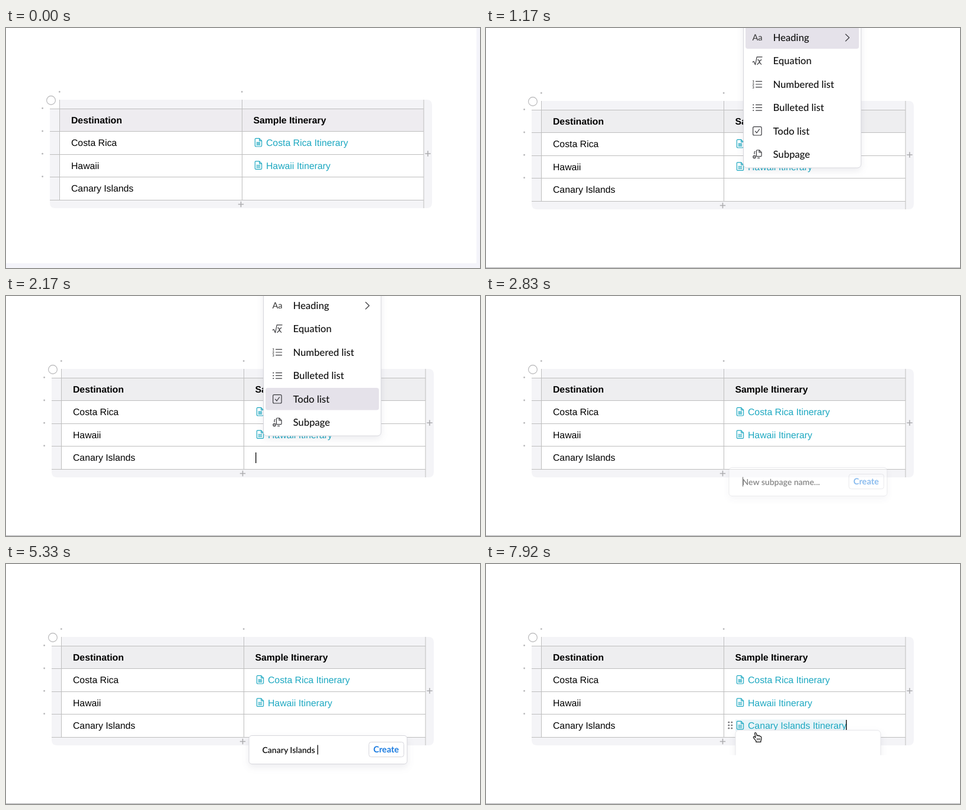
Recreate the animation shown at these times as an HTML page. Size 800 by 405 pixels, loop 8000 ms.

```html
<!DOCTYPE html>
<html lang="en">
<head>
<meta charset="utf-8">
<title>Table subpages</title>
<style>
  html, body { margin: 0; width: 100%; height: 100%; overflow: hidden; background: #fff; }
  svg { display: block; width: 800px; height: 405px; }
  text { white-space: pre; text-rendering: geometricPrecision; }
  .cell { font: 15.75px "Liberation Sans", Arial, sans-serif; }
  .head { font-weight: 700; }
  .link { fill: #1ca8c1; }
  .item { font: 500 16.6px Lato, sans-serif; fill: #111; }
  .field { font: 600 14px Lato, sans-serif; fill: #111; }
  .button { font: 700 14.6px Lato, sans-serif; fill: #1a7be0; }
  .grid { stroke: #bebebe; fill: none; }
  .strip { fill: #f4f4f7; }
  .header { fill: var(--header, #eeeef0); }
  .dots { fill: #b6b6b8; }
  .plus { stroke: #adadb0; stroke-width: 1.6; }
  .doc { fill: none; stroke: #1ca8c1; stroke-width: 1.15; stroke-linejoin: round; stroke-linecap: round; }
  .icon { fill: none; stroke: #3a3a3e; stroke-width: 1.2; stroke-linejoin: round; stroke-linecap: round; }
  .tiny { font: 700 5.5px Lato, sans-serif; fill: #333; }
  .card { fill: #fff; stroke: #d6d6dc; }
  .floating { filter: drop-shadow(0 5px 6px rgba(50, 50, 90, .09)); }
  .caret { fill: #111; }
  #before { --header: #eeecf0; }
</style>
</head>
<body>
<svg viewBox="0 0 800 405">
  <defs>
    <path id="doc" class="doc" d="M2 .7H8L12 4.7V12.6Q12 14.3 10.3 14.3H2.2Q.7 14.3.7 12.6V2.2Q.7.7 2 .7ZM8 .9V4.7H11.8M3.4 7.4H9.2M3.4 9.4H9.2M3.4 11.4H9.2"/>
    <clipPath id="cut"><rect x="400" y="260" width="300" height="62.5"/></clipPath>
    <g id="table">
      <path class="strip" d="M93 123H713Q722 123 722 132V297Q722 306 713 306H86Q77 306 77 297V138H93Z"/>
      <rect x="93" y="138" width="615" height="154" fill="#fff"/>
      <rect class="header" x="93" y="138" width="615" height="39"/>
      <path class="grid" d="M77 138.5H708M77 176.5H708M77 215.5H708M77 253.5H708M77 292.5H708M93.5 123V292M401.5 123V292M708 123V306"/>
      <circle cx="79" cy="124" r="7.4" fill="#fff" stroke="#b4b4b6" stroke-width="1.1"/>
      <g class="dots">
        <circle cx="93.3" cy="109.7" r="1.4"/><circle cx="401.2" cy="109.7" r="1.4"/>
        <circle cx="64.6" cy="137.4" r="1.4"/><circle cx="64.6" cy="176" r="1.4"/>
        <circle cx="64.6" cy="214.2" r="1.4"/><circle cx="64.6" cy="252.7" r="1.4"/>
      </g>
      <path class="plus" d="M394.8 299.5H404.2M399.5 294.8V304.2M710.3 214H719.7M715 209.3V218.7"/>
      <g class="cell">
        <text class="head" x="113" y="162.8">Destination</text>
        <text class="head" x="420.6" y="162.8">Sample Itinerary</text>
        <text x="113" y="201.3">Costa Rica</text>
        <text x="113" y="239.7">Hawaii</text>
        <text x="113" y="278.2">Canary Islands</text>
        <text class="link" x="442" y="201.3">Costa Rica Itinerary</text>
        <text class="link" x="442" y="239.7">Hawaii Itinerary</text>
      </g>
      <use href="#doc" x="422.6" y="187.7"/>
      <use href="#doc" x="422.6" y="226.1"/>
    </g>
  </defs>

  <rect width="800" height="405" fill="#fff"/>
  <rect y="404" width="800" height="1" fill="#b0b0b2"/>
  <use href="#table"/>
  <g id="before">
    <rect width="800" height="405" fill="#f4f4fa"/>
    <rect width="794" height="397" fill="#fff"/>
    <use href="#table" x="-3" y="-2"/>
  </g>

  <rect id="cellCaret" class="caret" x="421" y="264" width="1.4" height="18"/>

  <g id="menu">
    <rect class="card floating" x="434.5" y="-20" width="198.5" height="256" rx="6"/>
    <rect id="bar" x="438" width="191.5" height="37.6" rx="4" fill="#e5e2ea"/>
    <g id="items" class="item"></g>
    <text x="449.5" y="21" font-size="14.5" font-family="Lato, sans-serif" fill="#333">Aa</text>
    <g class="icon">
      <path d="M607 10.5L613 16.2L607 22"/>
      <path d="M450 57.5L452 56.3L454.5 62L457.2 48.8H466M458.6 53.8Q460.4 53.2 461 56T464.6 61.4M464.8 53.6Q462.6 54 461.4 57.2T457.8 61.4"/>
      <path d="M455.5 90.2H465.5M455.5 95H465.5M455.5 99.8H465.5M455.5 129.7H465.5M455.5 134.4H465.5M455.5 139.1H465.5"/>
      <path d="M451 129.7H451.4M451 134.4H451.4M451 139.1H451.4" stroke-width="1.7"/>
      <rect x="450.6" y="166.6" width="14.4" height="14.4" rx="2"/>
      <path d="M454.4 174.2L457 177L461.4 170.8"/>
      <path d="M457.5 206H461.2L465 209.8V215.5Q465 216.6 464 216.6H457.5Q456.4 216.6 456.4 215.5V207.2Q456.4 206 457.5 206ZM461 206.2V210H464.8M454 208.4Q453 208.6 453 209.8V212.6M461.6 219.4H458.6"/>
      <circle cx="453" cy="217.6" r="2.2" fill="#3a3a3e"/>
      <path d="M453 216V219.2M451.4 217.6H454.6" stroke="#fff" stroke-width=".8"/>
    </g>
    <g class="tiny"><text x="449.6" y="92">1</text><text x="449.6" y="96.9">2</text><text x="449.6" y="101.8">3</text></g>
  </g>

  <g id="popup">
    <rect class="card floating" x="410" y="289.5" width="267" height="48" rx="5"/>
    <rect class="card" x="612.5" y="300.5" width="59" height="25" rx="4"/>
    <text class="button" x="620" y="318">Create</text>
    <text id="field" class="field" x="432.5" y="318.5"></text>
    <rect id="fieldCaret" class="caret" y="305.5" width="1.4" height="16"/>
  </g>

  <g id="added">
    <rect id="tint" x="421" y="262.5" width="187" height="19.5" fill="#e8f4f8"/>
    <use href="#doc" x="422.6" y="264.6"/>
    <text class="cell link" x="442" y="278.2">Canary Islands Itinerary</text>
    <rect class="caret" x="607.6" y="263" width="1.4" height="18.5"/>
  </g>
  <g id="panel" clip-path="url(#cut)">
    <rect class="floating" x="421" y="280.5" width="245" height="80" rx="6" fill="#fff" stroke="#e6e6ea"/>
  </g>
  <g id="hover">
    <g fill="#77777a">
      <circle cx="409.8" cy="267.2" r="1.4"/><circle cx="414.8" cy="267.2" r="1.4"/>
      <circle cx="409.8" cy="272.2" r="1.4"/><circle cx="414.8" cy="272.2" r="1.4"/>
      <circle cx="409.8" cy="277.2" r="1.4"/><circle cx="414.8" cy="277.2" r="1.4"/>
    </g>
    <path fill="#fff" stroke="#111" stroke-width="1.2" stroke-linejoin="round"
      d="M455.8 300.4V298.6L452 293.8Q450.6 291.8 452 291.2Q453.2 290.8 455 293L453.6 286.2Q453.4 284.6 454.6 284.5Q455.7 284.4 456.2 286L457.4 290Q457.8 288.8 459 289.1Q460 289.4 460.2 290.3Q461 289.3 462 289.9Q462.8 290.4 462.8 291.2Q464.8 290.6 464.8 293V296Q464.6 297.4 463.8 298.4V300.4Z"/>
    <path stroke="#111" d="M457.8 294V297.4M460 294V297.4M462.2 294V297.4"/>
  </g>
</svg>
<script>
const LOOP = 8000;
const ROWS = ["Heading", "Equation", "Numbered list", "Bulleted list", "Todo list", "Subpage"];
const NAME = "Canary Islands Itinerary";
const KEYS = [3920, 4080, 4170, 4250, 4330, 4420, 4420, 4580, 4750, 4920, 5000, 5170,
  5250, 5330, 5330, 5500, 5670, 5750, 5830, 5920, 6000, 6080, 6170, 6250];
const DOWN = [1500, 2000, 2080, 2170, 2330];
const BLINK = [500, 920, 1250, 1670, 2080, 2420];
const FADE = [80, 160, 250, 330];

const el = id => document.getElementById(id);
const passed = (t, times) => times.filter(k => t >= k).length;
const within = (t, a, b) => t >= a && t < b;
const show = (id, alpha) => {
  el(id).style.display = alpha ? "" : "none";
  el(id).style.opacity = Number(alpha);
};
const rowY = i => 16.2 + i * 39.4;

ROWS.forEach((label, i) => {
  const text = document.createElementNS("http://www.w3.org/2000/svg", "text");
  text.setAttribute("x", 484.5);
  text.setAttribute("y", rowY(i) + 5.8);
  text.textContent = label;
  el("items").append(text);
});

function render(t) {
  show("before", 1 - passed(t, FADE) / FADE.length);
  show("cellCaret", passed(t, BLINK) % 2);

  show("menu", within(t, 1080, 2830) && (t < 1170 ? 0.6 : 1));
  el("bar").setAttribute("y", rowY(passed(t, DOWN)) - 18.8);

  show("popup", within(t, 2830, 6420) && Math.min(1, 0.5 + 0.25 * passed(t, [2920, 3000])));
  const typed = passed(t, KEYS);
  const field = el("field");
  field.textContent = typed ? NAME.slice(0, typed) : "New subpage name...";
  show("fieldCaret", !within(t, 3250, 3670));
  if (within(t, 2830, 6420))
    el("fieldCaret").setAttribute("x", 432.8 + (typed && field.getComputedTextLength()));

  show("added", t >= 7670);
  show("tint", t >= 7750);
  show("hover", t >= 7750);
  show("panel", t >= 7920 ? 1 : t >= 7830 ? 0.5 : 0);
}

function tick() {
  render(performance.now() % LOOP);
  requestAnimationFrame(tick);
}
tick();
</script>
</body>
</html>
```
